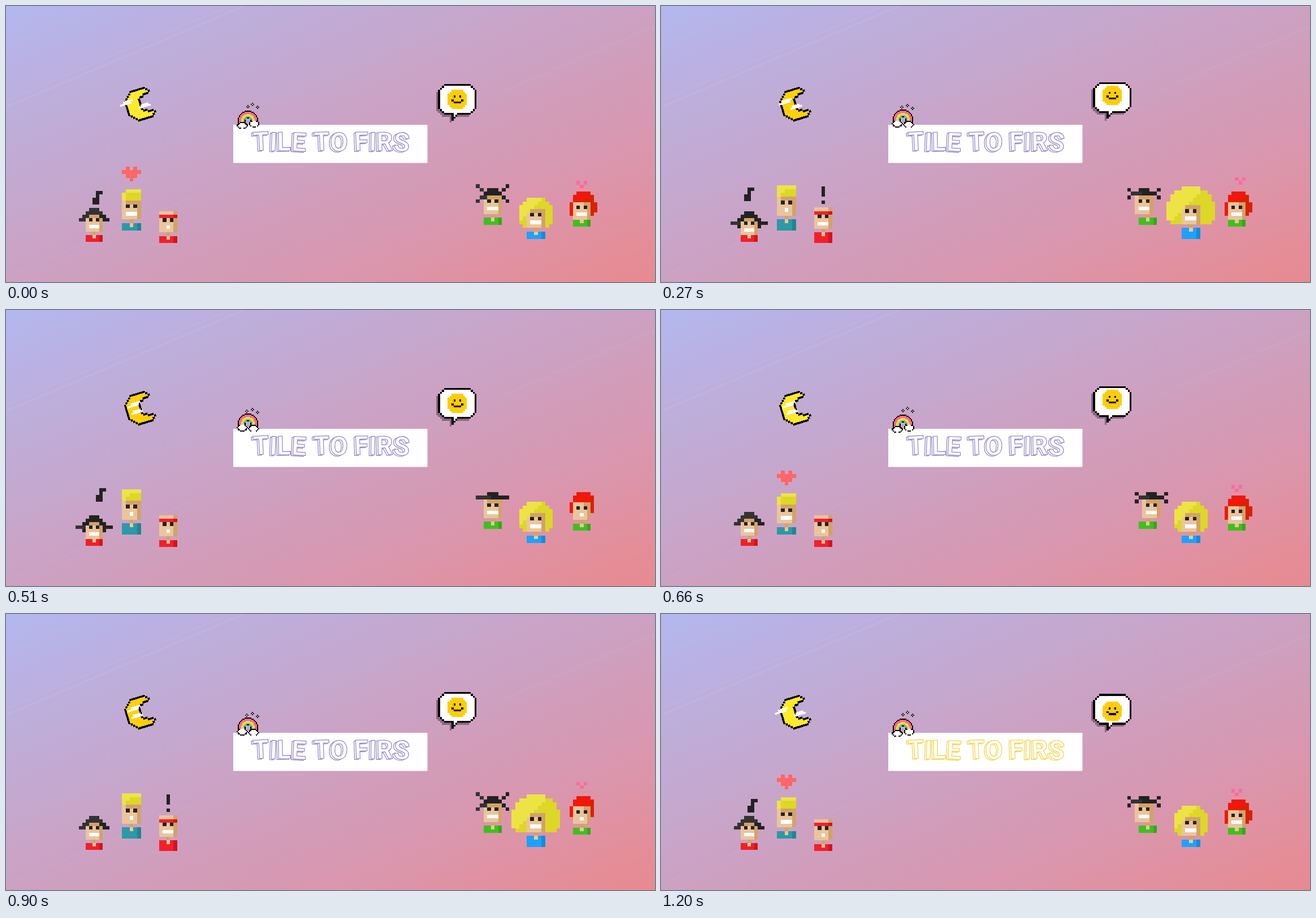
These frames come from a looping animation (1148x488 px, 1.29 s). An HTML page:

```html
<!DOCTYPE html>
<html lang="en">
<head>
<meta charset="utf-8">
<title>Pixel friends</title>
<style>
  html, body { margin: 0; width: 100%; height: 100%; overflow: hidden; }
  svg { display: block; width: 100%; height: 100%; }
  #scene { shape-rendering: crispEdges; }
  text { font: 700 46px Roboto, Arial, sans-serif; text-anchor: middle; stroke-width: 1.2; stroke-linejoin: round; fill: #fff; }
</style>
</head>
<body>
<svg viewBox="0 0 1148 488" preserveAspectRatio="none">
  <defs>
    <linearGradient id="sky" x1="0" y1="0" x2="1" y2="1">
      <stop offset="0" stop-color="#b2b8ef"/>
      <stop offset=".12" stop-color="#b9b1e3"/>
      <stop offset=".26" stop-color="#c0acd6"/>
      <stop offset=".5" stop-color="#cca1c2"/>
      <stop offset=".75" stop-color="#da96ad"/>
      <stop offset="1" stop-color="#e98a8f"/>
    </linearGradient>
  </defs>
  <rect width="1148" height="488" fill="url(#sky)"/>
  <g stroke="#fff" stroke-opacity=".05">
    <path d="M0 179L421 0" stroke-width="3"/>
    <path d="M0 168L395 0M880 150L1148 36M0 478L330 338" stroke-width="1.5"/>
  </g>
  <rect x="402" y="210" width="343.5" height="67.5" fill="#fff"/>
  <g id="title"></g>
  <g id="scene"></g>
</svg>
<script>
const LOOP = 1290, CYCLE = 600;
const SKIN = '#eac59b', SHADE = '#d3a268', INK = '#222', SOOT = '#343234';
const scene = document.getElementById('scene');
const title = document.getElementById('title');
let out = [];

// Latest value in a list of [time, value] pairs.
function at(keys, t) {
  let value = keys[0][1];
  for (const [start, v] of keys) if (t >= start) value = v;
  return value;
}

// A pen draws rectangles in cells of size u around an origin.
function pen(x, y, u) {
  return (c, r, w, h, fill) => out.push(
    `<rect x="${(x + c * u).toFixed(2)}" y="${(y + r * u).toFixed(2)}" width="${(w * u).toFixed(2)}" height="${(h * u).toFixed(2)}" fill="${fill}"/>`);
}

function raster(p, x0, y0, x1, y1, color, size = 1) {
  for (let y = y0; y < y1; y++)
    for (let x = x0; x < x1; x++) {
      const c = color(x, y);
      if (c) p(x, y, size, size, c);
    }
}

function face(p, eye, top, wide, dx = 0) {
  p(dx, top, 4, eye + 4 - top, SKIN);
  p(dx + 4, top, 1, eye + 4 - top, SHADE);
  p(dx + 1, eye, 1, 1, INK);
  p(dx + 3, eye, 1, 1, INK);
  if (wide) p(dx + 1, eye + 2, 3, 1, '#fff');
  else p(dx + 2, eye + 2, 1, 1, '#fff');
}

function body(p, top, bottom, fill, dark) {
  p(0, top, 5, bottom - top, fill);
  p(4, top, 1, bottom - top, dark);
  p(2, top - 1, 1, 1, SHADE);
  p(2, top, 1, 1, SKIN);
}

function hatGirl(low, note) {
  const p = pen(141, 357, 6), d = low ? 1 : 0;
  const hair = low ? INK : SOOT;
  body(p, 8, 10, '#f01f28', '#d5131c');
  face(p, 3 + d, 2 + d, true);
  p(1, d, 3, 1, hair);
  p(0, 1 + d, 5, 1, hair);
  p(1, 2 + d, 3, 1, SHADE);
  p(-1, 2 + d, 2, 1, hair);
  p(4, 2 + d, 2, 1, INK);
  if (low) {
    p(-3, 4, 3, 1, SOOT); p(5, 4, 3, 1, INK);
    p(-1, 5, 1, 1, INK); p(5, 5, 1, 1, INK);
  } else {
    p(-2, 3, 2, 1, SOOT); p(5, 3, 2, 1, INK);
  }
  if (note) {
    const [c, r] = note;
    p(c + 1, r, 2, 1, INK);
    p(c + 1, r + 1, 1, 1, INK);
    p(c, r + 2, 2, 2, INK);
  }
}

function blondMan(up) {
  const p = pen(205.3, 317, 6.7), d = up ? 0 : 1;
  const light = '#ede348';
  body(p, 9 + d, 12, '#2b9aa6', '#1e8690');
  face(p, 4 + d, 3 + d, !up);
  p(1, 3 + d, 3, 1, SHADE);
  p(0, 1 + d, 5, 2, '#ddd728');
  p(1 - up, d, 4 + up, 1, light);
  p(0, 1 + d, 1 + up, 1, light);
  p(0, 2 + d, 1, 1, light);
  if (!up) {
    const c = '#ff6666';
    p(1, -5, 1, 1, c); p(3, -5, 1, 1, c);
    p(0, -4, 5, 1, c); p(1, -3, 3, 1, c); p(2, -2, 1, 1, c);
  }
}

function headband(state) {
  const p = pen(271, 356.3, 6.3), d = state ? 0 : 1;
  body(p, 7 + d, 10, '#f3202a', '#d4141d');
  face(p, 2 + d, d, !!state);
  p(0, 1 + d, 5, 1, '#f3202a');
  p(4, 1 + d, 1, 1, '#d4141d');
  if (state) {
    p(2, -5 - state, 1, 3, INK);
    p(2, -1 - state, 1, 1, INK);
  }
}

function pigtails(pose) {
  const p = pen(844.5, 315.3, 6.55);
  const dx = pose === 'left' ? -1 : pose === 'right' ? 1 : 0;
  body(p, 9, 11, '#3fc01d', '#35a818');
  face(p, 4, 3, true, dx);
  p(dx + 1, 3, 3, 1, SHADE);
  p(dx + 1, 1, 3, 1, INK);
  if (pose === 'cross') {
    p(0, 2, 5, 1, INK);
    p(0, 3, 1, 1, SOOT);
    for (const [c, r] of [[1, 1], [2, 0]])
      for (const y of [r, 4 - r]) {
        p(-c, y, 1, 1, SOOT);
        p(4 + c, y, 1, 1, INK);
      }
  } else if (pose === 'hat') {
    p(-2, 2, 9, 1, INK);
    p(-2, 2, 4, 1, SOOT);
  } else {
    p(dx - 1, 2, 7, 1, INK);
    p(dx - 1, 2, 3, 1, SOOT);
    for (const c of [-2, 6]) for (const r of [1, 3]) p(dx + c, r, 1, 1, INK);
  }
}

const AFRO = {
  small: { half: 4, top: 3, bottom: 11, taper: [2, 3] },
  medium: { half: 5, top: 2, bottom: 10, taper: [3, 4, 4] },
  large: { half: 6, top: 0, bottom: 10, taper: [2, 4, 5, 5] }
};

function afro(size) {
  const p = pen(920.8, 319.3, 6.63);
  const { half, top, bottom, taper } = AFRO[size];
  const big = size === 'large', d = big ? 0 : 1;
  for (let r = top; r < bottom; r++) {
    const k = r - top;
    const h = r === bottom - 1 ? half - 1 : taper[k] || half;
    const lit = Math.min(5, (big ? 6 : 4) - k) - 2 + h;
    p(2 - h, r, h * 2 + 1, 1, '#ddd728');
    if (lit > 0) p(2 - h, r, lit, 1, '#eee345');
  }
  body(p, 11 + d, 14, '#1ca2fb', '#0c8fdc');
  face(p, 6 + d, 6 + d, true);
  p(1, 5 + d, 4, 1, SHADE);
  if (size === 'medium')
    for (const [c, r] of [[-4, 3], [4, 0], [8, 3]]) p(c, r, 1, 1, '#ddd728');
}

function redhead(up, heart) {
  const p = pen(1003, 321.8, 6.2), d = up ? 0 : 1;
  const red = '#f01808', dark = '#da2102';
  body(p, 9, 11, '#3fc01d', '#35a818');
  face(p, 4 + d, 3 + d, !up);
  p(3, 3 + d, 1, 1, SHADE);
  p(1, d, 4, 1, red);
  p(0, 1 + d, 6, 2, red);
  p(5, 1 + d, 1, 5, dark);
  p(-1, 3 + d, 1, up ? 3 : 4, red);
  if (!up) {
    p(3, 3, 3, 1, dark);
    p(5, 4, 2, 3, dark);
    p(5, 7, 1, 1, dark);
  }
  if (heart) {
    const [c, r] = heart;
    p(c, r, 1, 1, '#ff6a9c');
    p(c + 2, r, 1, 1, '#ff6a9c');
    p(c + 1, r + 1, 1, 1, '#ff6a9c');
  }
}

function moon(fill, shift) {
  const u = 3.5, p = pen(0, 0, u);
  const inside = (x, y) => {
    const a = (x + .5) * u, b = (y + .5) * u;
    return a < 18 && Math.hypot(a, b) < 26 && Math.hypot(a - 12, b) > 17;
  };
  out.push('<g transform="translate(239.5 173.5) rotate(-17)">');
  raster(p, -10, -10, 10, 10, (x, y) => {
    if (inside(x, y)) return fill;
    return inside(x - 1, y) || inside(x + 1, y) || inside(x, y - 1) || inside(x, y + 1) ? '#000' : null;
  }, 1.08);
  const s = shift * 2;
  p(-10.6 + s, -2.8, 6, 1, '#fff');
  p(-8.6 + s, -3.8, 5, 1, '#fff');
  p(-1.6 - s, 1, 6, 1, '#fff');
  p(-.6 - s, .1, 4, 1, '#fff');
  out.push('</g>');
}

function bubbleShape(p, fill, edge) {
  for (let r = 0; r < 16; r++) {
    const inset = Math.max(0, 3 - r, r - 12);
    p(inset, r, 20 - inset * 2, 1, edge);
    if (r > 0 && r < 15) p(inset + 1, r, 18 - inset * 2, 1, fill);
  }
  p(7, 15, 4, 1, edge);
  p(7, 16, 3, 1, edge);
  p(7, 17, 2, 1, edge);
  p(7, 18, 1, 1, edge);
  p(8, 15, 2, 1, fill);
  p(8, 16, 1, 1, fill);
}

function bubble(step) {
  const u = 3.4, x = 764.4, y = 138 + step * u;
  out.push('<g opacity=".45">');
  bubbleShape(pen(x - u, y + u, u), '#3a2038', '#3a2038');
  out.push('</g>');
  bubbleShape(pen(x, y, u), '#fff', '#000');
  const p = pen(x + 5 * u, y + (3 + step) * u, u);
  for (let r = 0; r < 10; r++) {
    const inset = Math.max(0, 2 - r, r - 7);
    p(inset, r, 10 - inset * 2, 1, '#ffcc0a');
  }
  p(3, 3, 1, 1, '#000'); p(6, 3, 1, 1, '#000');
  p(2, 5, 1, 1, '#000'); p(7, 5, 1, 1, '#000');
  p(3, 6, 4, 1, '#000');
}

function rainbow(up) {
  const p = pen(428, up ? 201 : 203, 2);
  const bands = [[2.2, null], [2.9, '#000'], [3.9, '#3ec3c0'], [5.9, '#ffe11f'], [8, '#fb6a92'], [9.1, '#000']];
  raster(p, -10, -10, 10, 4, (x, y) => {
    const d = Math.hypot(x + .5, Math.min(y + .5, 0));
    const band = bands.find(b => d < b[0]);
    return band && band[1];
  });
  const clouds = up ? [[-5, 3.6], [5, 4.4]] : [[-5, 4.3], [5.5, 2.6]];
  for (const [cx, cy] of clouds)
    raster(p, -10, -1, 11, 8, (x, y) => {
      const a = x + .5 - cx, b = y + .5 - cy;
      if (Math.hypot(a / 3.7, b / 2.3) < 1) return '#fff';
      return Math.hypot(a / 4.7, b / 3.1) < 1 ? '#000' : null;
    });
  const sparks = up
    ? [[425.5, 178.5, '#ffe11f'], [436, 176, '#ff6d96'], [444.5, 180.5, '#3ec3c0']]
    : [[428, 178, '#ff6d96'], [436, 174, '#ffe11f'], [444.5, 178.5, '#ff6d96']];
  for (const [x, y, c] of sparks) {
    const q = pen(x - 1, y - 1, 2);
    q(0, -1, 1, 1, '#222'); q(0, 1, 1, 1, '#222');
    q(-1, 0, 1, 1, '#222'); q(1, 0, 1, 1, '#222');
    q(0, 0, 1, 1, c);
  }
}

// Outlined letters with a second outline behind for depth.
const words = [['TILE', 483, '-3 2 -1 3'], ['TO', 573.5, '-2 2'], ['FIRS', 664, '-2 1 -1 3']];
title.innerHTML = [[-3, 1.5], [0, 0]].map(([dx, dy]) =>
  words.map(([w, x, tilt]) => `<text x="${x + 1 + dx}" y="${256 + dy}" rotate="${tilt}">${w}</text>`).join('')).join('');

function draw(t) {
  const phase = t % CYCLE;
  const hop = at([[0, 0], [180, 1], [360, 0], [480, 1]], phase);
  out = [];
  moon(at([[0, '#ffea2b'], [180, '#ffd00a'], [600, '#ffea2b'], [780, '#ffd00a'], [1200, '#ffea2b']], t),
    at([[0, 0], [180, 1], [330, 2], [990, 1], [1200, 0]], t));
  rainbow(hop);
  bubble(at([[0, 0], [180, -1], [300, 0], [390, 1], [480, 0], [600, -1], [780, 0], [810, 1], [870, 0],
    [990, -1], [1110, 0], [1200, 1]], t));
  hatGirl(t >= 150 && t < 600,
    at([[0, [2, -5]], [210, [1, -6]], [390, [3, -7]], [570, null], [1200, [2, -5]]], t));
  blondMan(hop);
  headband(at([[0, 0], [150, 1], [360, 2], [480, 0]], phase));
  pigtails(at([[0, 'cross'], [150, 'hat'], [210, 'left'], [390, 'cross'], [480, 'hat'], [600, 'right'],
    [780, 'hat'], [840, 'cross'], [1110, 'hat'], [1200, 'left']], t));
  afro(at([[0, 'small'], [180, 'medium'], [240, 'large'], [390, 'medium'], [480, 'small']], phase));
  redhead(phase >= 300, at([[0, [1, -2]], [210, [2, -3]], [300, [1, -4]], [390, null]], phase));
  scene.innerHTML = out.join('');
  title.setAttribute('stroke', t < 1200 ? '#8d84c9' : '#f6cf3c');
}

let last = -1;
function tick() {
  const t = Math.floor((performance.now() % LOOP) / 30) * 30;
  if (t !== last) draw(last = t);
  requestAnimationFrame(tick);
}
tick();
</script>
</body>
</html>
```
